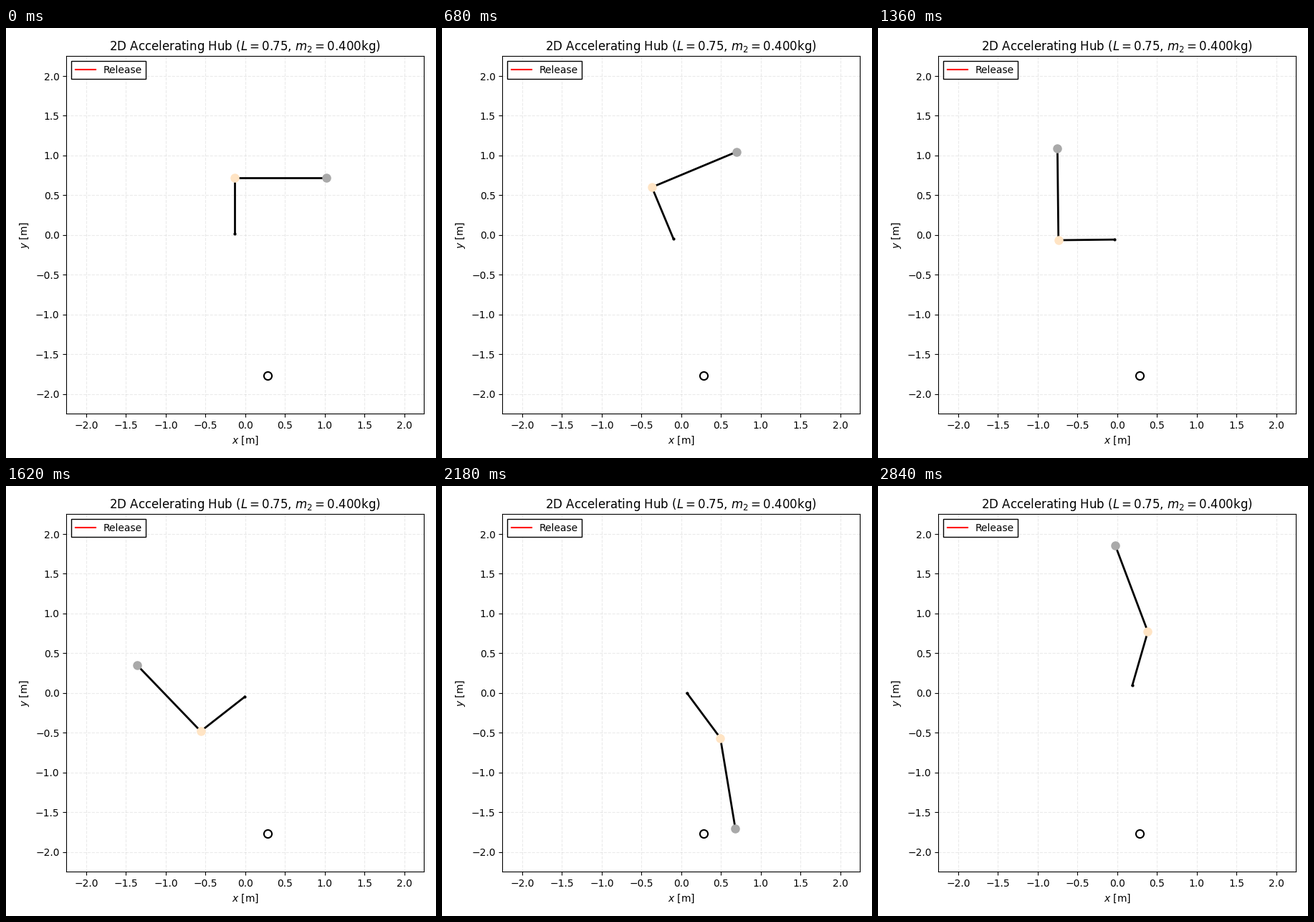
Recreate the animation shown at these times as a matplotlib script. Size 600 px wide and 600 px high, loop 2860 ms.

```python
import numpy as np
import matplotlib.pyplot as plt
from matplotlib.animation import FuncAnimation

SIZE, DPI = 600, 100
FRAMES, STEP = 143, 20          # 2860 ms per loop
LIM = 2.25
SCALE = 499 / (2 * LIM)         # pixels per metre
ARM, CLUB = 78 / SCALE, 128 / SCALE
RELEASE = 1.39                  # s, the wrist is locked until then


def hub_at(t):
    """Hub under constant acceleration."""
    x = -14.7 + 3.5 * t + 3.2 * t**2
    y = 1.4 - 14 * t + 6.07 * t**2
    return np.array([x, y]) / SCALE


def angles(t):
    """Arm and club directions in radians."""
    s = max(0, t - RELEASE)
    arm = 90 + 49 * t**2 - 52.5 * s**3 + 24.6 * s**4
    wrist = -90 + s**2 * (111.7 - 1.5 * s - 6.6 * s**2 - 11.6 * s**3)
    return np.radians([arm, arm + wrist])


def polar(r, a):
    return r * np.array([np.cos(a), np.sin(a)])


plt.rcParams["font.family"] = "DejaVu Sans"
fig = plt.figure(figsize=(SIZE / DPI, SIZE / DPI), dpi=DPI)
ax = fig.add_axes([84.3 / SIZE, 61.7 / SIZE, 499 / SIZE, 499 / SIZE])
ax.set(xlim=(-LIM, LIM), ylim=(-LIM, LIM), xlabel="$x$ [m]", ylabel="$y$ [m]")
ax.set_title("2D Accelerating Hub ($L=0.75$, $m_2=0.400$kg)")
ticks = np.arange(-2, 2.1, 0.5)
ax.set_xticks(ticks)
ax.set_yticks(ticks)
ax.grid(ls="--", alpha=0.25)

ax.plot([], [], color="red", label="Release")
ax.legend(loc="upper left", fancybox=False, edgecolor="black", framealpha=1)
ax.plot(0.281, -1.769, "o", ms=8, mfc="white", mec="black", mew=1.5)

links, = ax.plot([], [], color="black", lw=2)
dots = [ax.plot([], [], "o", ms=ms, color=c)[0]
        for c, ms in (("black", 2), ("bisque", 8), ("darkgray", 8))]


def update(i):
    t = i * STEP / 1000
    arm, club = angles(t)
    hub = hub_at(t)
    wrist = hub + polar(ARM, arm)
    tip = wrist + polar(CLUB, club)
    joints = np.array([hub, wrist, tip])
    links.set_data(*joints.T)
    for dot, (x, y) in zip(dots, joints):
        dot.set_data([x], [y])
    return [links, *dots]


anim = FuncAnimation(fig, update, frames=FRAMES, interval=STEP,
                     repeat=True, repeat_delay=0)
plt.show()
```
